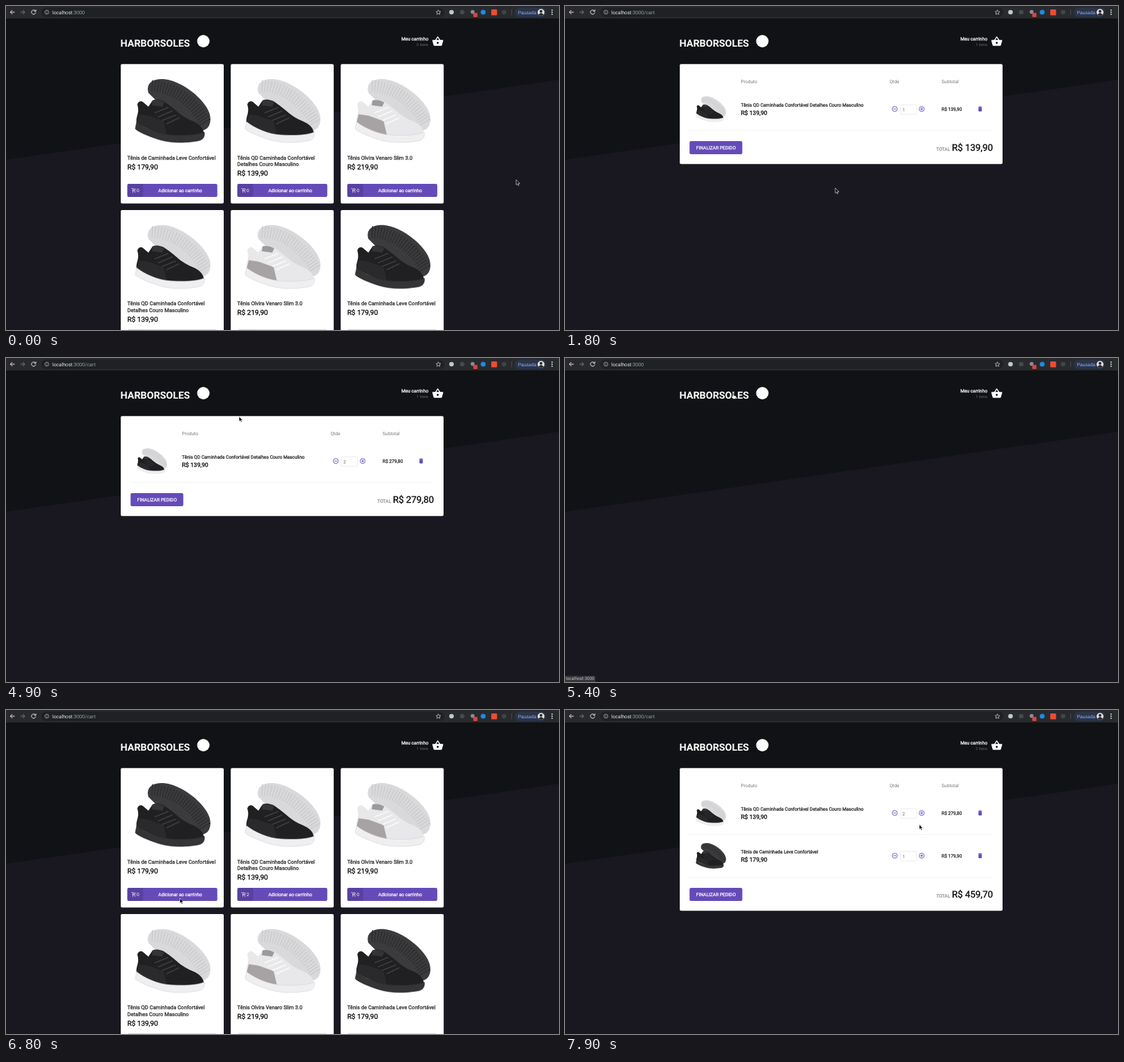
Write an HTML page that moves like this. It is 800 px wide and 470 px high and loops after 8 s.

```html
<!DOCTYPE html>
<html lang="pt-BR">
<head>
<meta charset="utf-8">
<title>Loja</title>
<style>
  html, body { margin: 0; width: 100%; height: 100%; overflow: hidden; background: #191720; }
  svg { display: block; width: 800px; height: 470px; }
  text { font-family: Roboto, Arial, sans-serif; text-rendering: geometricPrecision; white-space: pre; }
</style>
</head>
<body>
<svg id="stage" viewBox="0 0 800 470">
  <path d="M0 0H800V107L0 223Z" fill="#111215"/>
  <g id="toolbar"></g>
  <g id="page"></g>
  <g id="status">
    <path d="M0 461H42Q44 461 44 463V470H0Z" fill="#35363a"/>
    <text x="1.2" y="467.2" font-size="6.3" fill="#c3c5c9">localhost:3000</text>
  </g>
  <g id="cursor">
    <path id="arrow" d="M0 0V7.4L1.7 5.8 2.8 8.4 4.1 7.9 3 5.4H5.3Z" fill="#000" stroke="#fff" stroke-width=".6"/>
    <path id="hand" d="M1.2 .8Q2 -.2 2.8 .8V3.6L6 4.4Q7 4.8 6.8 6L6 9H2.2L-.4 5.8Q-.4 4.8 .6 5L1.2 5.6Z" fill="#fff" stroke="#000" stroke-width=".6"/>
  </g>
</svg>
<script>
const LOOP = 8000;
const PURPLE = '#654bb8';
const ICONS = {
  basket: 'M17.21 9l-4.38-6.56c-.19-.28-.51-.42-.83-.42-.32 0-.64.14-.83.43L6.79 9H2c-.55 0-1 .45-1 1 0 .09.01.18.04.27l2.54 9.27c.23.84 1 1.46 1.92 1.46h13c.92 0 1.69-.62 1.93-1.46l2.54-9.27L23 10c0-.55-.45-1-1-1h-4.79zM9 9l3-4.4L15 9H9zm3 8c-1.1 0-2-.9-2-2s.9-2 2-2 2 .9 2 2-.9 2-2 2z',
  addToCart: 'M11 9h2V6h3V4h-3V1h-2v3H8v2h3v3zm-4 9a2 2 0 1 0 0 4 2 2 0 0 0 0-4zm10 0a2 2 0 1 0 0 4 2 2 0 0 0 0-4zm-9.8-3.4l.9-1.6h7.45c.75 0 1.41-.41 1.75-1.03l3.86-7.01L19.42 4l-1.1 2-2.76 5H8.53L4.27 2H1v2h2l3.6 7.59-1.35 2.45c-.16.28-.25.61-.25.96 0 1.1.9 2 2 2h12v-2H7.42z',
  trash: 'M6 19c0 1.1.9 2 2 2h8c1.1 0 2-.9 2-2V7H6v12zM19 4h-3.5l-1-1h-5l-1 1H5v2h14V4z',
};

const black = { back: '#3b3b3d', groove: '#2a2a2c', upper: '#202022', heel: '#2a2a2c', tongue: '#343437', sole: '#343436', lace: '#3d3d40', edge: '#2c2c2e' };
const mixed = { ...black, back: '#d9d9db', groove: '#c9c9cc', sole: '#efeff1', edge: '#d2d2d5' };
const white = { back: '#d9d9db', groove: '#c9c9cc', upper: '#e8e8ea', heel: '#a7a2a3', tongue: '#9c9a9c', sole: '#efeff0', lace: '#fafafa', edge: '#d2d2d5' };

const leve = { lines: ['Tênis de Caminhada Leve Confortável'], price: 17990, look: black };
const couro = { lines: ['Tênis QD Caminhada Confortável', 'Detalhes Couro Masculino'], price: 13990, look: mixed };
const slim = { lines: ['Tênis Olvira Venaro Slim 3.0'], price: 21990, look: white };
const shelf = [leve, couro, slim, couro, slim, leve];

const money = cents => 'R$ ' + (cents / 100).toFixed(2).replace('.', ',');
const rect = (x, y, w, h, fill, r = 0, extra = '') =>
  `<rect x="${x}" y="${y}" width="${w}" height="${h}" rx="${r}" fill="${fill}" ${extra}/>`;
const dot = (x, y, r, fill) => `<circle cx="${x}" cy="${y}" r="${r}" fill="${fill}"/>`;
const line = (d, stroke, width = 1) =>
  `<path d="${d}" fill="none" stroke="${stroke}" stroke-width="${width}"/>`;
const label = (s, x, y, size, fill, { anchor = 'start', bold = true, weight = 400 } = {}) =>
  `<text x="${x}" y="${y}" font-size="${size}" fill="${fill}" text-anchor="${anchor}" font-weight="${weight}"` +
  `${bold ? ` stroke="${fill}" stroke-width=".25"` : ''}>${s}</text>`;
const icon = (name, x, y, size, fill) =>
  `<path d="${ICONS[name]}" fill="${fill}" transform="translate(${x} ${y}) scale(${size / 24})"/>`;
const group = (transform, body) => `<g transform="${transform}">${body}</g>`;

function shoe(c) {
  return `
    <path d="M206 126C202 112 212 105 228 106C255 108 290 137 295 158C298 173 291 181 281 181L246 166Z" fill="${c.back}"/>
    <path d="M211 116Q258 118 289 170" fill="none" stroke="${c.groove}" stroke-width="17" stroke-dasharray="1.2 3"/>
    <path d="M190 143C191 138 196 137 199 140L206 146 212 137C218 134 228 137 232 141C246 150 252 160 270 167C280 171 287 178 286 186L262 193 230 189 189 170C187 160 194 156 190 143Z" fill="${c.upper}"/>
    <path d="M192 157L206 159 228 167 233 188C215 184 200 176 189 169Z" fill="${c.heel}"/>
    <path d="M212 137C217 135 225 137 229 140L226 146 211 144Z" fill="${c.tongue}"/>
    <path d="M215 155l20-8M220 161l21-9M226 166l20-8M232 171l19-9" fill="none" stroke="${c.lace}" stroke-width="1.6"/>
    <path d="M189 168C200 177 220 186 238 187C258 188 274 188 287 183C288 190 285 195 276 196C258 199 238 199 222 194C206 189 190 182 187 178Z" fill="${c.sole}" stroke="${c.edge}" stroke-width=".6"/>`;
}

function productCard({ lines, price, look }, index, count) {
  const drop = (lines.length - 1) * 9.5;
  return group(`translate(${index % 3 * 159.1} ${index > 2 ? 211.8 : 0})`,
    rect(166, 84.3, 149, 202.2, '#fff', 2) + shoe(look) +
    lines.map((s, i) => label(s, 175.5, 222.5 + i * 9.5, 7.62, '#222')).join('') +
    label(money(price), 175.5, 236.7 + drop, 10, '#000') +
    rect(175.5, 258, 130.2, 19, PURPLE, 2) + rect(175.5, 258, 23, 19, 'rgba(0,0,0,.12)', 2) +
    icon('addToCart', 181.2, 263.7, 7.6, '#fff') +
    label(count, 189, 270, 6.67, '#fff', { bold: false }) +
    label('Adicionar ao carrinho', 252, 270, 6.67, '#fff', { anchor: 'middle' }));
}

function cartRow({ lines, price, look }, quantity, index) {
  return group(`translate(0 ${index * 62})`,
    group('translate(211 149.5) scale(.4) translate(-241 -152)', shoe(look)) +
    label(lines.join(' '), 254.5, 146, 6.67, '#222') +
    label(money(price), 254.5, 158, 8.6, '#000') +
    [477, 516].map(x => `<circle cx="${x}" cy="149.4" r="3.6" fill="none" stroke="${PURPLE}" stroke-width=".9"/>`).join('') +
    line('M475 149.4h4M514 149.4h4M516 147.4v4', PURPLE, .9) +
    rect(485.2, 143.2, 23.5, 13.8, '#fff', 1.8, 'stroke="#ddd" stroke-width=".6"') +
    label(quantity, 488, 152.5, 6.67, '#666', { bold: false }) +
    label(money(price * quantity), 544.8, 152, 6.67, '#222') +
    icon('trash', 595.8, 144.6, 9.5, PURPLE) +
    line('M180 180.7H618', '#eee', .7));
}

function cartPage(cart) {
  const total = cart.reduce((sum, [product, quantity]) => sum + product.price * quantity, 0);
  const heading = (s, x) => label(s, x, 111.7, 6.67, '#777', { bold: false });
  return rect(166, 84.3, 467, 83 + 62 * cart.length, '#fff', 2) +
    heading('Produto', 254.5) + heading('Qtde', 469.5) + heading('Subtotal', 544.8) +
    cart.map(([product, quantity], i) => cartRow(product, quantity, i)).join('') +
    group(`translate(0 ${62 * (cart.length - 1)})`,
      rect(180.2, 196, 76.3, 19, PURPLE, 2) +
      label('FINALIZAR PEDIDO', 218.4, 208, 6.67, '#fff', { anchor: 'middle' }) +
      label('TOTAL', 537, 210.4, 6.67, '#8c8c8c') +
      label(money(total), 619, 210.4, 13.4, '#000', { anchor: 'end' }));
}

const homePage = cart => shelf.map((product, i) => {
  const entry = i < 3 && cart.find(([p]) => p === product);
  return productCard(product, i, entry ? entry[1] : 0);
}).join('');

const header = items =>
  label('HARBORSOLES', 165.5, 58.8, 14.35, '#fff', { weight: 700, bold: false }) +
  dot(285.5, 51, 9, '#fff') +
  label('Meu carrinho', 611, 50, 6.67, '#fff', { anchor: 'end' }) +
  label(items + ' itens', 611, 57.8, 5.7, '#66656c', { anchor: 'end', bold: false }) +
  icon('basket', 616, 42.8, 17.2, '#fff');

const toolbar = path =>
  rect(0, 0, 800, 18, '#292a2d') + rect(51, 2, 583, 14, '#202124', 7) +
  line('M12.5 9H6.5M9.3 6L6.3 9L9.3 12', '#e8eaed') +
  line('M21 9H27M24.2 6L27.2 9L24.2 12', '#77797d') +
  line('M42.4 7A3.1 3.1 0 1 0 43 9.6M43.2 5.3V7.8H40.7', '#e8eaed') +
  line('M56.2 9a2.9 2.9 0 1 0 5.8 0a2.9 2.9 0 1 0 -5.8 0M59.1 8.6V10.8M59.1 7V7.8', '#bdc1c6', .7) +
  label(`localhost<tspan fill="#9aa0a6">:3000${path}</tspan>`, 67, 11.6, 7.15, '#e8eaed', { bold: false }) +
  line('M625.5 5.7l1 2.2 2.4.3-1.8 1.6.5 2.4-2.1-1.2-2.1 1.2.5-2.4-1.8-1.6 2.4-.3z', '#c4c7cb', .8) +
  dot(644.5, 9, 3.3, '#c4c7cb') + dot(660, 9, 3.3, '#48494d') +
  dot(675, 8.6, 2.8, '#8b8d91') + rect(676, 10, 6, 6, '#d9453b', 1) +
  dot(690.3, 9, 3.6, '#1e88e5') + rect(702, 5, 8.4, 8.4, '#ee4b36', 1) + dot(720.5, 9, 3.3, '#434448') +
  line('M731.5 5V13', '#55575b', .7) +
  rect(736, 2.5, 45, 13.5, '#2b3448', 6.7) +
  label('Pausada', 740.8, 11.6, 6.8, '#8ab4f8', { bold: false }) +
  dot(774, 9.2, 5, '#dfe1e4') + dot(774, 7.7, 2, '#25262a') +
  '<path d="M770.3 12.4Q774 8.2 777.7 12.4Q774 15.6 770.3 12.4Z" fill="#25262a"/>' +
  [6, 9, 12].map(y => dot(790, y, .9, '#e8eaed')).join('');

const one = [[couro, 1]], two = [[couro, 2]], both = [[couro, 2], [leve, 1]];
const scenes = [
  { at: 0, path: '', cart: [], view: homePage },
  { at: 1800, path: '/cart', cart: one, view: cartPage },
  { at: 4200, path: '/cart', cart: two, view: cartPage },
  { at: 5400, path: '', cart: two, view: () => '' },
  { at: 5500, path: '', cart: two, view: homePage },
  { at: 6800, path: '/cart', cart: two, view: homePage },
  { at: 6900, path: '/cart', cart: both, view: cartPage },
];

// Pointer moves: start, end, destination x, y
const moves = [
  [0, 0, 738, 252],
  [50, 1400, 391, 264],
  [2550, 3000, 524, 168],
  [3250, 3650, 531, 150],
  [3750, 4100, 515.5, 148.5],
  [4450, 5200, 241, 50.5],
  [5650, 6600, 251.5, 273],
  [7150, 7900, 512.5, 166],
];
const ease = p => p * p * (3 - 2 * p);

function pointer(t) {
  let x = 0, y = 0;
  for (const [start, end, toX, toY] of moves) {
    if (t < start) break;
    const p = end > start ? ease(Math.min(1, (t - start) / (end - start))) : 1;
    x += (toX - x) * p;
    y += (toY - y) * p;
  }
  return [x, y];
}

const $ = id => document.getElementById(id);
const show = (id, on) => { $(id).style.display = on ? '' : 'none'; };
let current;

function draw() {
  const t = performance.now() % LOOP;
  const scene = scenes.findLast(s => t >= s.at);
  if (scene !== current) {
    current = scene;
    $('toolbar').innerHTML = toolbar(scene.path);
    $('page').innerHTML = header(scene.cart.length) + scene.view(scene.cart);
  }
  const [x, y] = pointer(t);
  const overLogo = x > 165 && x < 298 && y > 40 && y < 62;
  $('cursor').setAttribute('transform', `translate(${x} ${y})`);
  show('hand', overLogo);
  show('arrow', !overLogo);
  show('status', overLogo);
  requestAnimationFrame(draw);
}
draw();
</script>
</body>
</html>
```
